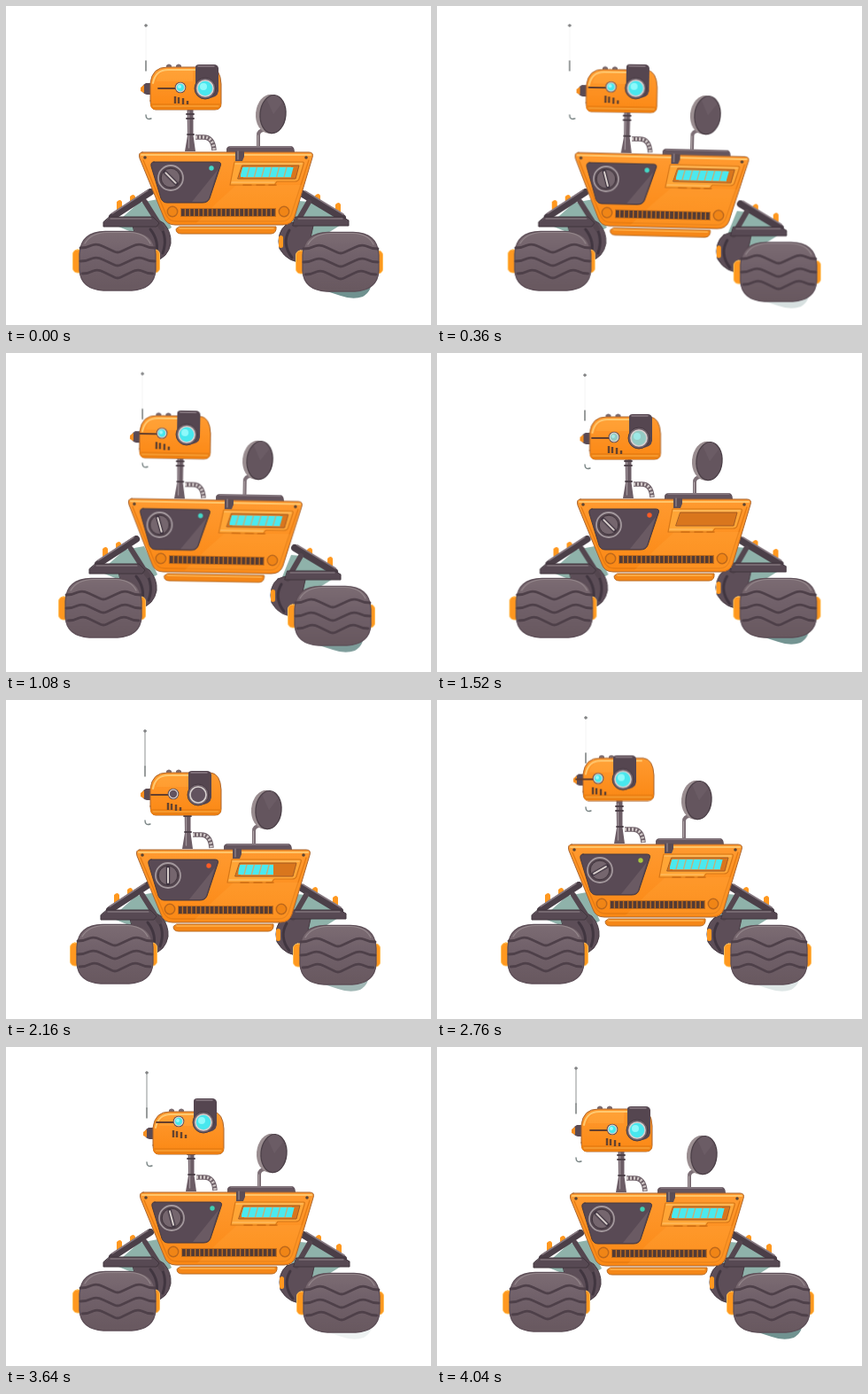
An HTML page that plays this animation: 480x360 px, repeating every 4080 ms.

```html
<!DOCTYPE html>
<html lang="en">
<head>
<meta charset="utf-8">
<title>Rover</title>
<style>
html, body { margin: 0; width: 100%; height: 100%; overflow: hidden; background: #fff; }
svg { display: block; width: 480px; height: 360px; }
.move { animation: 4080ms ease-in-out infinite; }
.snap { animation: 4080ms step-end infinite; }
#left { animation-name: left; }
#right { animation-name: right; }
#body { animation-name: body; transform-origin: 248px 166px; }
#dish { animation-name: dish; }
#head { animation-name: head; transform-origin: 203px 92px; }
#face { animation-name: face; }
#antenna { animation-name: antenna; }
#rod { animation-name: rod; }
#dial { animation-name: dial; transform-origin: 186px 194px; }
#cells { animation-name: cells; transform-origin: 266px 187px; }
#led { animation-name: led; }
#shade { animation-name: shade; }
.eye { animation-name: eye; }
.glint { animation-name: glint; }

@keyframes left {
  0%, 100% { transform: translate(0, 0); }
  8% { transform: translate(5px, 0); }
  16.67% { transform: translate(-9px, -1px); }
  27% { transform: translate(-16px, 0); }
  37.25% { transform: translate(6.5px, 0); }
  52.94%, 67.65% { transform: translate(-3px, -1px); }
  89.22% { transform: translate(0, -1px); }
  99.02% { transform: translate(-1px, 0); }
}
@keyframes right {
  0%, 100% { transform: translate(0, 0); }
  8% { transform: translate(8px, 12px); }
  16.67% { transform: translate(-8px, -22px); }
  27% { transform: translate(-9px, 8px); }
  37.25% { transform: translate(7.5px, -1px); }
  52.94%, 67.65% { transform: translate(-3px, -1px); }
  89.22% { transform: translate(1px, 0); }
  99.02% { transform: translate(0, 0); }
}
@keyframes body {
  0%, 100% { transform: translate(0, 0) rotate(0deg); }
  8% { transform: translate(6px, 3px) rotate(1.5deg); }
  16.67% { transform: translate(-14px, -11.5px) rotate(-3.2deg); }
  27% { transform: translate(-12px, 1px) rotate(1deg); }
  37.25% { transform: translate(8px, 0) rotate(0deg); }
  52.94% { transform: translate(-3px, 4px) rotate(0deg); }
  67.65% { transform: translate(-2px, -2px) rotate(0deg); }
  89.22% { transform: translate(1px, -1px) rotate(0deg); }
  99.02% { transform: translate(0, 0) rotate(0deg); }
}
@keyframes dish {
  0%, 100% { transform: translate(0, 0); }
  16.67% { transform: translate(-5px, -5px); }
  37.25% { transform: translate(-2px, 0); }
  52.94% { transform: translate(-2px, -2px); }
  67.65% { transform: translate(-4px, -7px); }
  89.22% { transform: translate(0, -1px); }
}
@keyframes head {
  0%, 100% { transform: translate(0, 0) rotate(0deg); }
  8% { transform: translate(6px, 3px) rotate(1deg); }
  16.67% { transform: translate(-16px, -4px) rotate(-3deg); }
  27% { transform: translate(-12px, 2px) rotate(1deg); }
  37.25% { transform: translate(9.5px, 3px) rotate(0deg); }
  52.94% { transform: translate(0, 13px) rotate(0deg); }
  67.65% { transform: translate(2px, -3.5px) rotate(0deg); }
  89.22% { transform: translate(3px, 4px) rotate(0deg); }
  99.02% { transform: translate(0, 1px) rotate(0deg); }
}
@keyframes face {
  0%, 100% { transform: translate(0, 0); }
  16.67% { transform: translate(-11px, -6px); }
  37.25% { transform: translate(-6.5px, 0); }
  52.94% { transform: translate(-8px, 1px); }
  67.65% { transform: translate(-17px, 0); }
  89.22% { transform: translate(-5px, -12px); }
  99.02% { transform: translate(1px, 0); }
}
@keyframes antenna {
  0%, 100% { transform: translate(0, 0); }
  16.67% { transform: translate(-15px, 0); }
  37.25% { transform: translate(9px, 3px); }
  52.94% { transform: translate(-1px, 13px); }
  67.65% { transform: translate(10px, -2px); }
  89.22% { transform: translate(1px, 7px); }
  99.02% { transform: translate(-1px, 2px); }
}
@keyframes rod {
  0%, 60% { opacity: .1; }
  45%, 80% { opacity: 1; }
}
@keyframes dial {
  0%, 37.25%, 99.02%, 100% { transform: rotate(-45deg); }
  16.67% { transform: rotate(8deg); }
  52.94% { transform: rotate(0deg); }
  67.65% { transform: rotate(60deg); }
  89.22% { transform: rotate(-15deg); }
}
@keyframes cells {
  0% { transform: scaleX(1); }
  33.3% { transform: scaleX(0); }
  47% { transform: scaleX(.143); }
  48.7% { transform: scaleX(.286); }
  50.3% { transform: scaleX(.429); }
  52% { transform: scaleX(.66); }
  54.5% { transform: scaleX(.857); }
  57% { transform: scaleX(1); }
}
@keyframes led {
  0% { fill: #43d7c6; }
  33.3% { fill: #ff5b24; }
  57% { fill: #a8c83e; }
  78% { fill: #3fcfb0; }
}
@keyframes shade {
  0%, 30% { opacity: 1; }
  14%, 86% { opacity: 0; }
}
@keyframes eye {
  0%, 31%, 60%, 100% { fill: #48e7ee; }
  37.25% { fill: #94cbc4; }
  46%, 54% { fill: #62535f; }
}
@keyframes glint {
  0%, 33%, 60%, 100% { opacity: .75; }
  46%, 54% { opacity: 0; }
}
</style>
</head>
<body>
<svg viewBox="0 0 480 360" stroke-linecap="round" stroke-linejoin="round">
  <defs>
    <linearGradient id="orange" x2="0" y2="1">
      <stop offset="0" stop-color="#ff9a30"/><stop offset="1" stop-color="#fb8814"/>
    </linearGradient>
    <linearGradient id="rubber" x2="0" y2="1">
      <stop offset="0" stop-color="#7c6c73"/><stop offset=".4" stop-color="#71616a"/><stop offset="1" stop-color="#68585f"/>
    </linearGradient>
    <path id="tread" d="M-42-15Q-35-15-29-18Q-23-20-17-17L-4-11Q0-9 4-11L17-17Q23-20 29-18Q35-15 42-15" fill="none" stroke="#4e4049" stroke-width="2.8"/>
    <g id="wheel">
      <g fill="#ff981f" stroke="#ffc05c">
        <rect x="-50.5" y="-13" width="14" height="26" rx="5"/>
        <rect x="36.5" y="-13" width="11" height="26" rx="5"/>
      </g>
      <path d="M-43-8C-42-26-32-33-14-33.5H14C32-33 42-26 43-8V10C42 25 33 32 16 33H-16C-33 32-42 25-43 10Z" fill="url(#rubber)" stroke="#5d4e57" stroke-width="1.3"/>
      <path d="M-37-20Q-30-32-12-32.5H14Q31-32 37-20" fill="none" stroke="#95888c" stroke-width="1.2"/>
      <use href="#tread"/><use href="#tread" y="15"/><use href="#tread" y="29" transform="scale(.95 1)"/>
    </g>
  </defs>

  <g id="left" class="move">
    <path d="M122 247L150 222L172 218L187 250L164 264Z" fill="#8fb2aa"/>
    <path d="M143 246Q164 234 178 245Q187 255 186 268Q183 284 168 288L150 276Z" fill="#5d4e58" stroke="#463a42"/>
    <path d="M163 252Q174 266 169 282M174 248Q183 262 177 279" fill="none" stroke="#413640" stroke-width="3"/>
    <path d="M125 230v-9q4-4 6 0v9ZM140 223v-8q4-4 6 0v8Z" fill="#ff981f"/>
    <path d="M163 210L120 238" stroke="#4b3f48" stroke-width="8"/>
    <path d="M160 208L120 234" stroke="#877981" stroke-width="1.5"/>
    <path d="M157 221L176 251" stroke="#54464f" stroke-width="6"/>
    <path d="M117 238H166L173 245L170 249H110V244Z" fill="#574953" stroke="#40353d"/>
    <path d="M118 240H164" stroke="#94888d"/>
    <use href="#wheel" transform="translate(126 288)"/>
  </g>

  <g id="right" class="move">
    <path d="M331 220L353 222L383 244L351 264L314 262Z" fill="#8fb2aa"/>
    <path d="M316 247Q330 240 347 248L338 289Q319 291 309 274Q305 256 316 247Z" fill="#5d4e58" stroke="#463a42"/>
    <path d="M320 253Q311 268 323 284" fill="none" stroke="#413640" stroke-width="3"/>
    <rect x="308" y="259" width="5" height="14" rx="2.5" fill="#ff981f"/>
    <path d="M349 220v-6q4-4 6 0v6ZM372 232v-8q4-4 6 0v8Z" fill="#ff981f"/>
    <path d="M335 212L380 239" stroke="#4b3f48" stroke-width="8"/>
    <path d="M338 209L381 235" stroke="#877981" stroke-width="1.5"/>
    <path d="M342 221L327 247" stroke="#54464f" stroke-width="6"/>
    <path d="M327 238H380L387 242V248H324Z" fill="#574953" stroke="#40353d"/>
    <path d="M330 240H380" stroke="#94888d"/>
    <path id="shade" class="move" d="M350 318L413 306Q414 322 403 328Q392 332 378 327Z" fill="#6f918f"/>
    <use href="#wheel" transform="translate(378 289)"/>
  </g>

  <g id="body" class="move">
    <g id="dish" class="move">
      <path d="M285 165V146Q285 140 292 140" fill="none" stroke="#7d6f76" stroke-width="4"/>
      <path d="M284.5 164V146" stroke="#b3a9ab"/>
      <g transform="rotate(5 300 122)">
        <ellipse cx="298" cy="122" rx="16" ry="22" fill="#9a8d90"/>
        <ellipse cx="301.5" cy="122" rx="14.5" ry="21.5" fill="#64555e" stroke="#4c4048" stroke-width="1.3"/>
        <path d="M302 122L293 106Q302 95 311 108Z" fill="#6b5c65"/>
      </g>
    </g>
    <path d="M249 165V161Q250 158 254 158H322Q326 159 326 165Z" fill="#64555e"/>
    <path d="M253 159H322" stroke="#a0949a"/>
    <path d="M214 148H223Q234 148 235 163" fill="none" stroke="#70626a" stroke-width="5.5" stroke-linecap="butt"/>
    <path d="M214 148H223Q234 148 235 163" fill="none" stroke="#d2cac9" stroke-width="3.5" stroke-dasharray="2 2" stroke-linecap="butt"/>
    <path d="M204.500 112H211.500V146L214 164H202L205 146Z" fill="#6c5d66"/>
    <path d="M206.500 119V160" stroke="#a0949a" stroke-width="1.3"/>
    <path d="M204 122H212M204 127H212M205 145H212" stroke="#4d4149" stroke-width="1.8"/>

    <path d="M196 249H305V252Q304 257 299 257H198Q192 257 192 252Z" fill="#f58718" stroke="#b96a21"/>
    <path d="M196 251H302" stroke="#ffb44d" stroke-width="1.5"/>
    <path d="M154 165H342Q348 165 346 171L326 238Q323 247 313 247H191Q181 247 178 238L151 172Q149 165 154 165Z" fill="url(#orange)" stroke="#a9652f"/>
    <path d="M153 168H344" stroke="#ffc469" stroke-width="2"/>
    <path d="M155 174L181 236Q184 243 193 243H311Q319 243 322 236L342 174" fill="none" stroke="#e67b12" stroke-width="1.3"/>
    <path d="M238 222L260 202H334L325 238Q322 245 313 245H215Z" fill="#ffad45" opacity=".22"/>
    <g fill="#5b4432">
      <circle cx="157" cy="171" r="1.8"/><circle cx="339" cy="171" r="1.8"/>
    </g>

    <path d="M167 176H239Q244 176 242 181L230 217Q228 222 222 222H182Q177 222 175 217L164 181Q163 176 167 176Z" fill="#594a55" stroke="#46393f"/>
    <path d="M210 221L239 185L229 217Q227 221 222 221Z" fill="#6a5a63"/>
    <circle cx="186" cy="194" r="14" fill="#54464f" stroke="#a3989d" stroke-width="1.8"/>
    <circle cx="186" cy="194" r="10.8" fill="#75666e" stroke="#40353d"/>
    <g id="dial" class="move">
      <path d="M186 185V203" stroke="#403541" stroke-width="4.5"/>
      <path d="M186 186V202" stroke="#d8cfcc" stroke-width="2"/>
    </g>
    <circle id="led" class="snap" cx="232" cy="183" r="2.7" fill="#43d7c6"/>

    <path d="M258 176H335Q337 176 336 179L331 195Q330 198 326 198H306L303 202H253Z" fill="#ffa536" stroke="#d67617" stroke-width="1.2"/>
    <path d="M259 178H334M255 199H303" stroke="#ffc671" stroke-width="1.2"/>
    <path d="M267 180H331L327 195H262Z" fill="#d9761d" stroke="#a45b23"/>
    <clipPath id="strip"><path id="cells" class="snap" d="M265 178H325V196H265Z"/></clipPath>
    <g clip-path="url(#strip)">
      <path d="M268 187.500H322" stroke="#a4f7ee" stroke-width="12" stroke-linecap="butt" opacity=".45"/>
      <path d="M266 187.500H324" stroke="#4be9ef" stroke-width="11" stroke-dasharray="7 1.4" stroke-linecap="butt" transform="translate(50 0) skewX(-15)"/>
    </g>
    <path d="M268 202h9M283 202h9M297 202h8" stroke="#cf6d13" stroke-width="1.5"/>
    <path d="M259 164H269V170L267 175H259Z" fill="#5b4d55"/>
    <path d="M262 164V173" stroke="#a0949a"/>

    <path d="M197 233H305" stroke="#c46e1b" stroke-width="10" stroke-linecap="butt"/>
    <path d="M198 233H304" stroke="#533b35" stroke-width="8" stroke-dasharray="3.7 1.4" stroke-linecap="butt"/>
    <g fill="#f08516" stroke="#bd681b" stroke-width="1.5">
      <circle cx="188" cy="232" r="5.7"/><circle cx="314" cy="232" r="5.7"/>
    </g>
  </g>

  <g id="antenna" class="move" fill="none" stroke="#8d9191">
    <path id="rod" class="snap" d="M158 23V62"/>
    <path d="M158 62V73" stroke="#6d7272" stroke-width="1.4"/>
    <circle cx="158" cy="22" r="1.3" fill="#766e72"/>
    <path d="M158 123Q158 129 164 127" stroke="#7a8585" stroke-width="1.4"/>
  </g>

  <g id="head" class="move">
    <path d="M181 71v-4q3-3 6 0v4ZM192 71v-4q3-3 6 0v4Z" fill="#7b6b70"/>
    <path d="M165 87H158Q153 90 153 94Q154 99 159 100H165Z" fill="#5a4a53"/>
    <path d="M156 89L152 92V96L156 98Z" fill="#f58e20"/>
    <path d="M163 107V87Q165 69 182 69H231Q242 70 243 88V110Q243 117 236 117H169Q163 117 163 107Z" fill="url(#orange)" stroke="#a9652f"/>
    <path d="M180 73H211V85H170Q171 76 180 73Z" fill="#ffb34a" opacity=".3"/>
    <path d="M166 87Q169 72 183 72H229" fill="none" stroke="#ffc970" stroke-width="2"/>
    <path d="M163 110H243Q243 117 236 117H169Q163 117 163 110Z" fill="#ec8013"/>
    <path d="M166 113H240" stroke="#ffb148"/>
    <g id="face" class="move">
      <path d="M172 93H192" stroke="#653f2c" stroke-width="1.8"/>
      <circle cx="197" cy="92" r="6.3" fill="#594b56"/>
      <circle class="eye move" cx="197" cy="92" r="4.8" fill="#48e7ee" stroke="#ded6d0" stroke-width="1.2"/>
      <circle class="glint move" cx="196" cy="91" r="2" fill="#b5ffff"/>
      <path d="M214 69Q214 66 218 66H235Q239 66 240 70V96Q239 104 227 104Q215 104 214 95Z" fill="#554650"/>
      <path d="M217 68H235" stroke="#8b7c84" stroke-width="1.5"/>
      <circle cx="225" cy="93" r="12" fill="#70616a" stroke="#463942"/>
      <circle class="eye move" cx="225" cy="93" r="9" fill="#48e7ee" stroke="#d7d1cf" stroke-width="1.6"/>
      <circle class="glint move" cx="223" cy="91" r="4" fill="#a4ffff"/>
      <path d="M191 102V110M195 103V110M200 104V111M205 107V111" stroke="#65432e" stroke-width="2.4" stroke-linecap="butt"/>
    </g>
  </g>
</svg>
</body>
</html>
```
